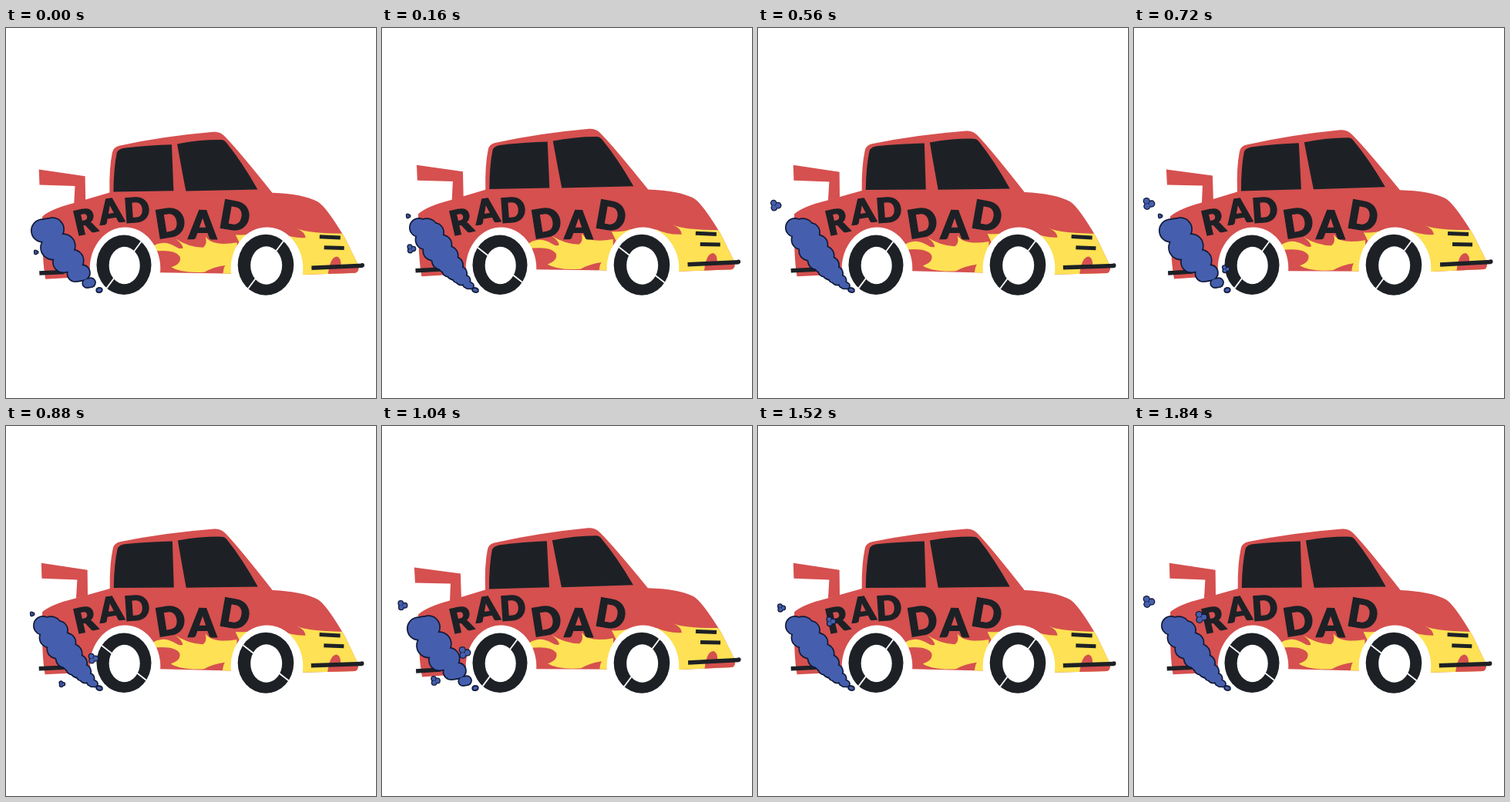
An HTML page with a canvas for the animation above (1.92 s loop, 480 by 480 pixels).

```html
<!DOCTYPE html>
<html lang="en">
<head>
<meta charset="utf-8">
<title>Rad Dad car</title>
<style>
  html, body { margin: 0; width: 100%; height: 100%; overflow: hidden; background: #fff; }
  canvas { display: block; width: 480px; height: 480px; }
</style>
</head>
<body>
<canvas id="stage" width="480" height="480"></canvas>
<script>
const ctx = document.getElementById('stage').getContext('2d');
const LOOP = 1920, STEP = 80;
const RED = '#d5504f', INK = '#1d2126', YELLOW = '#fee154';
const BLUE = '#455fae', NAVY = '#111a38';

const body = new Path2D(`M47 244 Q58 234 88 226 L134 212 Q133 180 137 160 Q138 153 146 151
  Q205 138 268 132 Q277 131 284 139 Q300 155 345 210 Q385 211 404 221 Q415 227 440 268
  L457 302 Q460 311 454 313 L387 316 L200 315 L52 325 Q47 300 47 244 Z`);
const spoiler = new Path2D('M42 183 L102 191 L103 224 L88 228 L89 204 L43 203 Z');
const windows = [
  new Path2D('M143 160 Q144 156 152 154 Q185 150 214 149 L217 209 L139 211 Q139 180 143 160 Z'),
  new Path2D('M221 148 Q250 142 278 142 Q282 142 285 146 Q305 170 326 206 L233 209 Q228 185 221 148 Z')
];
const midFlame = new Path2D(`M188 283 Q203 271 220 281 Q226 285 230 283 Q229 277 220 271
  Q238 282 256 282 Q262 278 259 268 Q268 281 300 275 L300 322 L282 322 Q282 309 285 305
  Q270 307 258 314 Q228 316 215 308 Q229 303 226 294 Q219 284 190 288 Z`);
const frontFlame = new Path2D(`M298 265 Q312 266 322 262 L356 262 Q372 269 389 268
  Q388 260 377 256 Q394 263 445 262 L465 320 L380 322 L310 290 Z`);
const grille = new Path2D('M418 320 Q420 292 430 292 Q436 294 435 306 L465 302 L465 320 Z');

const clamp = u => Math.max(0, Math.min(1, u));

function oval(x, y, rx, ry, color) {
  ctx.fillStyle = color;
  ctx.beginPath();
  ctx.ellipse(x, y, rx, ry, 0, 0, 7);
  ctx.fill();
}

function line(x1, y1, x2, y2, width, color = INK) {
  ctx.lineWidth = width;
  ctx.strokeStyle = color;
  ctx.beginPath();
  ctx.moveTo(x1, y1);
  ctx.lineTo(x2, y2);
  ctx.stroke();
}

function fill(path, color) {
  ctx.fillStyle = color;
  ctx.fill(path);
}

// dark discs first, blue ones on top: the union gets one outline
function cloud(discs, edge) {
  for (const [x, y, r] of discs) oval(x, y, r + edge, r + edge, NAVY);
  for (const [x, y, r] of discs) oval(x, y, r, r, BLUE);
}

// the rear and the nose lift in turn, a quarter cycle apart
function drawBody(phase) {
  const rear = phase > 1 ? -2.8 : .6;
  const nose = phase % 3 ? 0 : 4.5;
  ctx.save();
  ctx.translate(44, 250 + rear);
  ctx.rotate((nose - rear) / 386);
  ctx.translate(-44, -250);
  ctx.save();
  if (phase > 1) ctx.translate(2.5, -2.5);
  fill(spoiler, RED);
  ctx.restore();
  fill(body, RED);
  ctx.save();
  ctx.clip(body);
  fill(midFlame, YELLOW);
  fill(frontFlame, YELLOW);
  fill(grille, RED);
  ctx.restore();
  windows.forEach(w => fill(w, INK));
  line(407, 266.5, 434, 267.5, 5);
  line(413, 280.5, 439, 281, 5);
  line(397, 307, 463, 303.5, 5.5);
  line(44, 317.5, 76, 315.5, 5.5);
  oval(463, 303, 2.5, 2.8, INK);
  ctx.restore();
}

// letters sit on a parabola y + rise*i + bend*i*i and tilt evenly
function drawWord(word, { x, y, gap, rise, bend, size, tilt, turn }) {
  ctx.font = `900 ${size}px Lato, "Open Sans", sans-serif`;
  ctx.textAlign = 'center';
  ctx.fillStyle = ctx.strokeStyle = INK;
  ctx.lineWidth = 1.3;
  [...word].forEach((ch, i) => {
    ctx.save();
    ctx.translate(x + gap * i, y + rise * i + bend * i * i);
    ctx.rotate((tilt + turn * i) * Math.PI / 180);
    ctx.fillText(ch, 0, size * .36);
    ctx.strokeText(ch, 0, size * .36);
    ctx.restore();
  });
}

function drawWheel(x, r, flip) {
  const a = flip ? .62 : -.89;
  const dx = r * Math.cos(a), dy = r * 1.09 * Math.sin(a);
  oval(x + 1.5, 312, r * 1.29, 53.5, '#fff');
  oval(x, 307.3, r, r * 1.09, INK);
  line(x - dx, 307.3 - dy, x + dx, 307.3 + dy, 1.8, '#fff');
  oval(x + .7, 308, r * .565, r * .68, '#fff');
}

// beads shrink along a bent spine; each has a lobe on either side
function drawTrail(lumpy) {
  const count = lumpy ? 7 : 5, spread = lumpy ? .72 : .45;
  const headX = lumpy ? 58 : 54, tilt = lumpy ? .3 : -.15;
  const discs = [];
  for (let i = 0; i <= count; i++) {
    const u = i / count;
    const x = headX + (121 - headX) * u;
    const y = 262 + 78 * u * (1.5 - .5 * u);
    const r = 2 + (1 - u) ** 1.5 * (12 + 30 * u);
    for (const side of [-1, 0, 1]) {
      const d = side * spread * r;
      discs.push([x + d, y + d * tilt, side && lumpy ? r * .8 : r]);
    }
  }
  cloud(discs, 1.7);
}

// a puff waits, then drifts, rising fast at first while it grows
function drawPuff({ born, wait = 0, drift, life = wait + drift, x, y, dx, dy }, t) {
  const age = t - born;
  if (age < 0 || age > life) return;
  const u = clamp((age - wait) / drift), ease = Math.sqrt(u);
  const px = x + dx * u, py = y + dy * ease, s = .4 + .85 * ease;
  cloud([[px - 2.2 * s, py - 2.8 * s, 2.6 * s], [px + 3 * s, py, 2.7 * s],
         [px - 1.6 * s, py + 2.6 * s, 2.7 * s]], 1.3);
}

const stray = { born: 0, drift: 480, x: 39, y: 291, dx: -3, dy: -8 };
const puffs = [
  { born: 640, drift: 400, x: 122, y: 328, dx: -15, dy: -34 },
  { born: 860, drift: 420, x: 73, y: 337, dx: -9, dy: -10 },
  { born: 1200, drift: 640, x: 102, y: 267, dx: -15, dy: -19 }
];
for (let born = 160; born < 1800; born += 560)
  puffs.push({ born, wait: 160, drift: 320, life: 560, x: 34, y: 244, dx: -15, dy: -16 });

function frame() {
  const step = Math.floor(performance.now() % LOOP / STEP);
  const t = step * STEP, phase = step % 4, flip = step % 3 === 2;
  ctx.fillStyle = '#fff';
  ctx.fillRect(0, 0, 480, 480);
  drawBody(phase);
  drawWord('RAD', { x: 102.5, y: 251, gap: 33.5, rise: -19.5, bend: 6, size: 44, tilt: -13, turn: 4.5 });
  drawWord('DAD', { x: 213, y: 252.5, gap: 42, rise: 10, bend: -7.2, size: 51, tilt: -9, turn: 9.5 });
  drawWheel(153, 35.5, flip);
  drawWheel(337, 36.3, flip);
  drawPuff(stray, t);
  drawTrail(phase > 1);
  puffs.forEach(p => drawPuff(p, t));
  requestAnimationFrame(frame);
}
frame();
</script>
</body>
</html>
```
